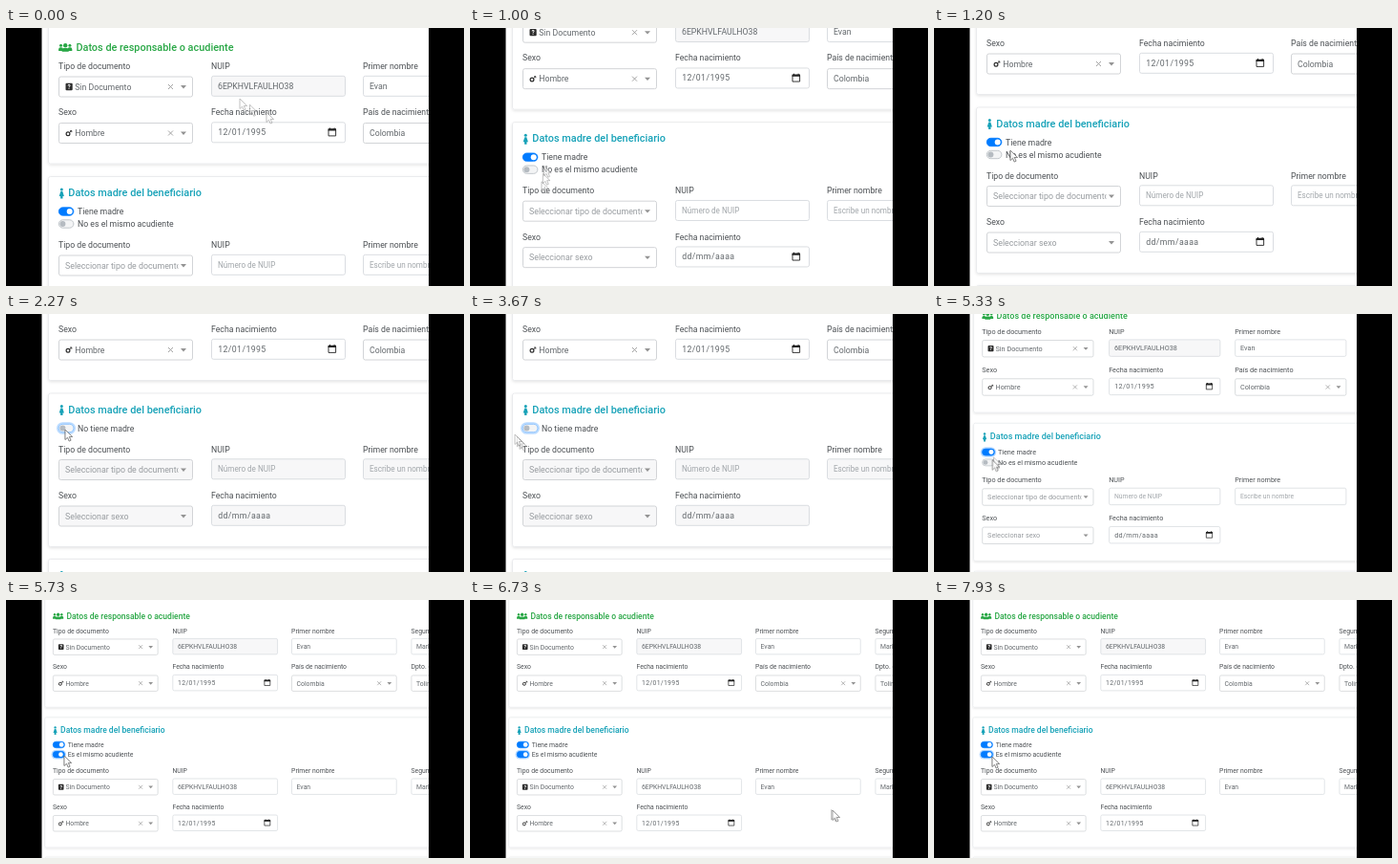
Animation of 480x270 px, one loop 8 s. Source, as an HTML page:

```html
<!DOCTYPE html>
<html lang="es">
<head>
<meta charset="utf-8">
<style>
html, body { margin: 0; width: 100%; height: 100%; overflow: hidden; background: #000; }
svg { display: block; }
text { font: 8.72px Roboto, sans-serif; fill: #4c5054; white-space: pre; }
.title { font-size: 10.9px; font-weight: 500; }
.value { fill: #63686c; }
.date { fill: #63686c; letter-spacing: .4px; }
.hint { font-size: 8.15px; fill: #a2a7ab; }
.pick { font-size: 8.82px; fill: #979b9f; }
</style>
</head>
<body>
<svg width="480" height="270" viewBox="0 0 480 270">
  <defs>
    <clipPath id="pickClip"><rect x="55" y="0" width="125.5" height="400"/></clipPath>
    <filter id="shadow" x="-5%" y="-10%" width="110%" height="125%">
      <feDropShadow dx="0" dy="1.2" stdDeviation="1.5" flood-opacity=".11"/>
    </filter>
    <path id="arrow" d="M0 0V10.5L2.5 8.2L4.2 12L6 11.2L4.3 7.5H7.6Z" fill="#fff" stroke="#666" stroke-width=".8"/>
  </defs>
  <svg x="37.5" width="405.5" height="270" viewBox="37.5 0 405.5 270">
    <rect x="37" width="406" height="270" fill="#fff"/>
    <g id="page"></g>
    <use class="pointer" href="#arrow" opacity=".5"/>
    <use class="pointer" href="#arrow" opacity=".5"/>
    <use class="pointer" href="#arrow" opacity=".5"/>
  </svg>
</svg>
<script>
const LOOP = 8000;
const MOTHER_OFF = 1870, MOTHER_ON = 4270, SAME_ON = 5600;
const COLS = [55, 215, 374, 534];
const GREEN = '#28a745', TEAL = '#17a2b8';

const text = (x, y, s, cls = '', extra = '') =>
  `<text x="${x}" y="${y + 3}" class="${cls}" ${extra}>${s}</text>`;
const title = (x, y, s, color) => text(x, y, s, 'title', `style="fill:${color}"`);
const card = (top, bottom) =>
  `<rect x="44.5" y="${top}" width="700" height="${bottom - top}" rx="2" fill="#fff" stroke="#e6e8ea" stroke-width=".8" filter="url(#shadow)"/>`;
const box = (x, y, disabled, stroke = '#d6dade') =>
  `<rect x="${x + .5}" y="${y - 10.5}" width="140" height="21" rx="2" fill="${disabled ? '#f7f7f8' : '#fff'}" stroke="${stroke}" stroke-width=".9"/>`;

// Plain inputs sit slightly higher than selects
const LIFT = .7;

function input(x, y, value, { hint = false, disabled = false } = {}) {
  return box(x, y - LIFT, disabled) + text(x + 7, y - LIFT, value, hint ? 'hint' : 'value');
}

function select(x, y, value, { icon = '', hint = false, disabled = false } = {}) {
  const clear = hint ? '' :
    `<path d="M${x + 115} ${y - 2.5}l5 5m0-5l-5 5" stroke="#999" stroke-width=".9"/>`;
  return box(x, y, disabled, '#cdd0d3') + icon +
    text(x + (icon ? 17.2 : 7), y, value, hint ? 'pick' : 'value', hint ? 'clip-path="url(#pickClip)"' : '') +
    clear + `<path d="M${x + 128} ${y - 1.5}h6l-3 3.4z" fill="#939393"/>`;
}

function date(y, value, { disabled = false } = {}) {
  const x = COLS[1], top = y - LIFT;
  const calendar = disabled ? '' :
    `<path d="M${x + 123} ${top - 3}h7.6v6.6h-7.6z" fill="none" stroke="#222" stroke-width=".9"/>
     <path d="M${x + 122.6} ${top - 4}h8.4v2.2h-8.4zM${x + 124} ${top - 4.7}h1v1h-1zM${x + 128.6} ${top - 4.7}h1v1h-1z" fill="#222"/>`;
  return box(x, top, disabled) + text(x + 7.2, top, value, 'date') + calendar;
}

const docIcon = y =>
  `<rect x="62.5" y="${y - 3.7}" width="7.2" height="7.4" rx="1" fill="#2b2b2b"/>` +
  `<text x="66.1" y="${y + 2.4}" text-anchor="middle" style="font-size:6.5px;font-weight:700;fill:#fff">?</text>`;
const sexIcon = y =>
  `<path d="M66.4 ${y - .4}L68.6 ${y - 2.4}M67.2 ${y - 2.5}H68.8V${y - .9}" fill="none" stroke="#2b2b2b" stroke-width=".9"/>
   <circle cx="65" cy="${y + .8}" r="1.9" fill="none" stroke="#2b2b2b" stroke-width="1.2"/>`;
const person = (x, y, color, w = 2.6) =>
  `<g fill="${color}"><circle cx="${x}" cy="${y - 4}" r="1.5"/>
   <path d="M${x - 1} ${y - 2}h2l${w - 1} 5h-1.4v2.6h${-2 * w + 2.8}v-2.6h-1.4z"/></g>`;
const people = (x, y) => `<g fill="${GREEN}">` + [[-4.7, 1.5], [4.7, 1.5], [0, 2.2]].map(([dx, r]) =>
  `<circle cx="${x + dx}" cy="${y - 2.3}" r="${r}"/>
   <path d="M${x + dx - r * 1.6} ${y + 2 + r}v-1.5q0-2.2 2-2.2h${r * 3.2 - 4}q2 0 2 2.2v1.5z"/>`).join('') + '</g>';

const BIRTH = '12/01/1995', ID = '6EPKHVLFAULHO38', FIRST = 'Evan', SECOND = 'Marlon';

const rowLabels = (y, names) => names.map((n, i) => text(COLS[i], y, n)).join('');
const FIRST_ROW = ['Tipo de documento', 'NUIP', 'Primer nombre', 'Segundo nombre'];
const SECOND_ROW = ['Sexo', 'Fecha nacimiento'];

function guardianCard() {
  return card(-4, 142) + people(62.2, 20.5) +
    title(73.4, 20.8, 'Datos de responsable o acudiente', GREEN) +
    rowLabels(40, FIRST_ROW) +
    select(COLS[0], 61.5, 'Sin Documento', { icon: docIcon(61.5) }) +
    input(COLS[1], 61.5, ID, { disabled: true }) +
    input(COLS[2], 61.5, FIRST) + input(COLS[3], 61.5, SECOND) +
    rowLabels(88, [...SECOND_ROW, 'País de nacimiento', 'Dpto. de nacimiento']) +
    select(COLS[0], 110, 'Hombre', { icon: sexIcon(110) }) + date(110, BIRTH) +
    select(COLS[2], 110, 'Colombia') + select(COLS[3], 110, 'Tolima');
}

// mode: 'empty', 'off' (disabled, one switch row less) or 'same' (filled in)
function motherCard(mode) {
  const up = mode === 'off' ? 13 : 0, filled = mode === 'same';
  const opts = { hint: !filled, disabled: mode === 'off' };
  const pick = (value, hint) => filled ? value : hint;
  const y1 = 248.5 - up, y2 = 297 - up;
  return `<g id="${mode}">` + card(155.5, 329 - up) + person(58.3, 173, TEAL) +
    title(65.3, 173, 'Datos madre del beneficiario', TEAL) +
    text(75, 192, mode === 'off' ? 'No tiene madre' : 'Tiene madre') +
    (up ? '' : text(75, 205, pick('Es', 'No es') + ' el mismo acudiente')) +
    rowLabels(227 - up, FIRST_ROW) +
    select(COLS[0], y1, pick('Sin Documento', 'Seleccionar tipo de documento'), { ...opts, icon: pick(docIcon(y1), '') }) +
    input(COLS[1], y1, pick(ID, 'Número de NUIP'), opts) +
    input(COLS[2], y1, pick(FIRST, 'Escribe un nombre'), opts) +
    input(COLS[3], y1, pick(SECOND, 'Escribe un nombre'), opts) +
    rowLabels(275.5 - up, SECOND_ROW) +
    select(COLS[0], y2, pick('Hombre', 'Seleccionar sexo'), { ...opts, icon: pick(sexIcon(y2), '') }) +
    date(y2, pick(BIRTH, 'dd/mm/aaaa'), opts) +
    card(342 - up, 520) + person(58.3, 360 - up, TEAL, 2) +
    title(65.3, 360 - up, 'Datos padre del beneficiario', TEAL) + '</g>';
}

const toggle = (id, y) => `<g id="${id}">
  <rect class="halo" x="53" y="${y - 6.3}" width="20" height="12.6" rx="6.3" fill="#007bff" opacity=".27"/>
  <rect class="track" x="55.3" y="${y - 4.2}" width="15.6" height="8.4" rx="4.2" stroke-width=".8"/>
  <circle class="knob" cy="${y}" r="3"/></g>`;

const $ = s => document.querySelector(s);
const modes = ['empty', 'off', 'same'];
$('#page').innerHTML = guardianCard() + modes.map(motherCard).join('') +
  toggle('mother', 192) + toggle('same-switch', 205);
const pointers = [...document.querySelectorAll('.pointer')];

const clamp = v => Math.min(1, Math.max(0, v));
const smooth = u => u * u * (3 - 2 * u);
const mix = (a, b, u) => a + (b - a) * u;
const ramp = (t, start, length) => clamp((t - start) / length);

// Pointer path: time, x, y
const path = [
  [-70, 273, 88], [-30, 255, 80], [0, 245, 74], [70, 245, 74], [200, 90, 22], [330, 424, 60], [530, 70, 194],
  [730, 70, 194], [1130, 80, 128], [1400, 80, 128], [1570, 192, 103], [1730, 62, 121],
  [2540, 62, 121], [2800, 375, 150], [3130, 340, 182], [3340, 340, 182], [3600, 52, 131],
  [3670, 47, 126], [3730, 47, 126], [3930, 422, 160], [4200, 64, 119], [4800, 64, 119],
  [4930, 70, 136], [5070, 70, 136], [5330, 61, 153], [5500, 61, 163], [5870, 61, 163],
  [6200, 300, 190], [6700, 380, 220], [6900, 380, 220], [7230, 250, 16], [7400, 60, 30], [7720, 61, 164]
];

function pointerAt(t) {
  const i = path.findIndex(p => p[0] > t);
  if (i < 0) return path.at(-1).slice(1);
  if (i === 0) return path[0].slice(1);
  const [t0, x0, y0] = path[i - 1], [t1, x1, y1] = path[i];
  const u = smooth((t - t0) / (t1 - t0));
  return [mix(x0, x1, u), mix(y0, y1, u)];
}

function setToggle(id, on, focused) {
  const track = $(`#${id} .track`), knob = $(`#${id} .knob`);
  const blue = on > .5;
  track.setAttribute('fill', blue ? '#007bff' : '#f3f4f5');
  track.setAttribute('stroke', blue ? '#007bff' : focused ? '#80bdff' : '#b5bbc1');
  knob.setAttribute('fill', blue ? '#fff' : '#b5bbc1');
  knob.setAttribute('cx', mix(59.4, 66.7, on));
  $(`#${id} .halo`).style.display = focused ? '' : 'none';
}

function draw(t) {
  const scroll = -72.5 * smooth(ramp(t, 700, 430));
  const zoom = 1 - .216 * (1 - (1 - ramp(t, 5018, 470)) ** 1.4);
  $('#page').setAttribute('transform',
    `translate(${27.2 * (1 - zoom)} ${scroll + 340 * (1 - zoom)}) scale(${zoom})`);

  const off = t >= MOTHER_OFF && t < MOTHER_ON, same = t >= SAME_ON;
  const mode = off ? 'off' : same ? 'same' : 'empty';
  for (const m of modes) $('#' + m).style.display = m === mode ? '' : 'none';
  setToggle('mother', 1 - ramp(t, MOTHER_OFF, 150) + ramp(t, MOTHER_ON, 150), t >= MOTHER_OFF && !same);
  setToggle('same-switch', ramp(t, SAME_ON, 150), same);
  $('#same-switch').style.display = off ? 'none' : '';

  // Fast moves leave a fading trail
  pointers.forEach((p, i) => {
    const [x, y] = pointerAt(t - (2 - i) * 35);
    p.setAttribute('transform', `translate(${x} ${y})`);
  });
}

function tick() {
  draw(performance.now() % LOOP);
  requestAnimationFrame(tick);
}
tick();
</script>
</body>
</html>
```
